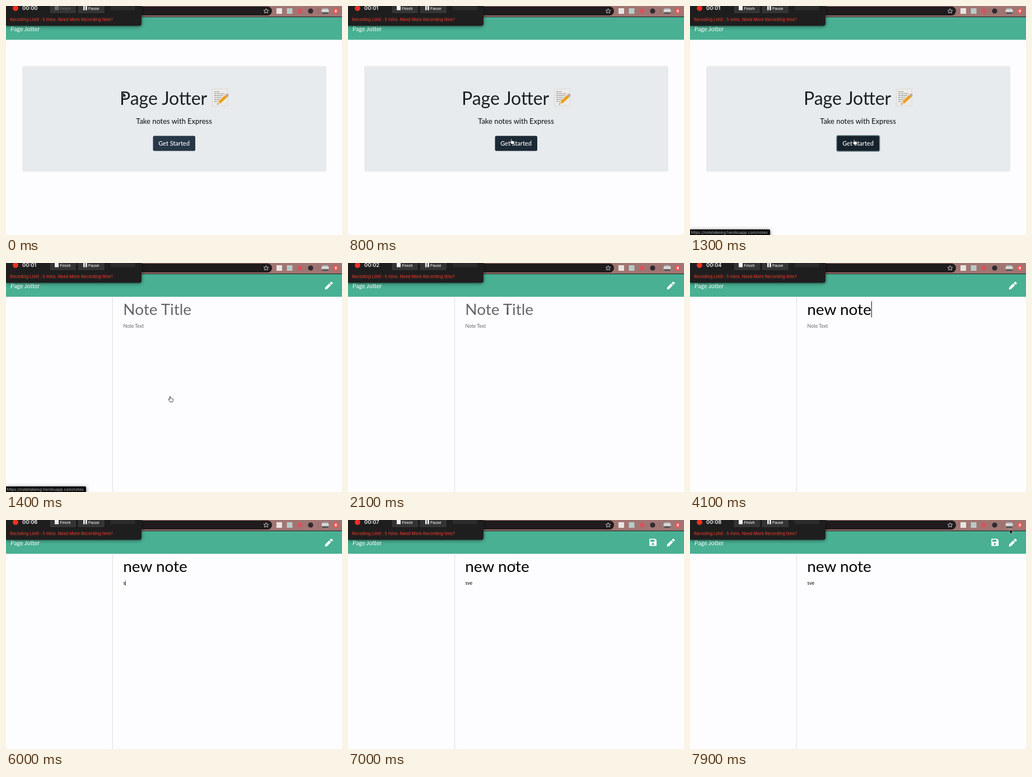
Recreate the animation shown at these times as an HTML page. Size 600 px wide and 410 px high, loop 8000 ms.

```html
<!DOCTYPE html>
<html lang="en">
<head>
<meta charset="utf-8">
<title>Page Jotter</title>
<style>
  html, body { margin: 0; width: 100%; height: 100%; overflow: hidden; background: #fdfcfe; }
  svg { display: block; width: 600px; height: 410px; font-family: Lato, sans-serif; }
  .ui { font-family: Inter, sans-serif; }
  .medium { font-weight: 500; }
  .panel { filter: drop-shadow(0 1px 3px rgba(0, 0, 0, .55)); }
</style>
</head>
<body>
<svg viewBox="0 0 600 410">
  <defs>
    <linearGradient id="photo" x2="0" y2="1">
      <stop offset="0" stop-color="#77787a"/>
      <stop offset=".4" stop-color="#e4e3e2"/>
      <stop offset=".62" stop-color="#c9c8c8"/>
      <stop offset=".75" stop-color="#39383a"/>
      <stop offset="1" stop-color="#9b9999"/>
    </linearGradient>
    <pattern id="meter" width="3" height="9" patternUnits="userSpaceOnUse">
      <path fill="#2e2e2f" d="M0 0h2v9H0z"/>
    </pattern>
  </defs>
  <rect width="600" height="410" fill="#fdfcfe"/>

  <!-- browser bar -->
  <rect width="600" height="20" fill="#a07572"/>
  <rect y="19" width="600" height="1" fill="#241b1b"/>
  <rect x="100" y="1" width="375" height="16" rx="8" fill="#201c1d"/>
  <path d="M464.500 4.700l1.300 2.800 3 .3-2.200 2 .6 3-2.700-1.600-2.700 1.600.6-3-2.200-2 3-.3z" fill="none" stroke="#e4dfdf" stroke-width=".9"/>
  <rect x="483" y="4" width="10" height="10" fill="#e9e4e2"/>
  <rect x="501.500" y="4" width="10" height="10" fill="#b9c9c5"/>
  <circle cx="525" cy="9" r="4" fill="#d9515c"/>
  <circle cx="544" cy="9" r="4.600" fill="#302a31"/>
  <path d="M557.500 4v10" stroke="#8a6261" stroke-width=".7"/>
  <circle cx="570" cy="9" r="6.600" fill="url(#photo)"/>
  <circle cx="589" cy="9" r="5" fill="#ec5b5d"/>
  <path d="M589 6.400l2.200 2.700h-1.400v2.300h-1.600v-2.300h-1.400z" fill="#fff"/>

  <!-- site header -->
  <rect y="20" width="600" height="40.500" fill="#49b093"/>
  <text x="8" y="44.500" font-size="10.700" fill="#fff">Page Jotter</text>

  <g id="home">
    <rect x="29" y="107.500" width="543" height="189" rx="3" fill="#e8ebed"/>
    <text x="203" y="176.500" font-size="32" fill="#1c1f22">Page Jotter</text>
    <g id="memo">
      <path d="M368.500 149l27.500-1 .5 30-28 1.500z" fill="#ecebe8" stroke="#d0cfcc" stroke-width=".7"/>
      <path d="M372 153.500h9M372 157h18M372 160.500h16M372 164h13M372 167.500h9M372 171h6" stroke="#77777a" stroke-width="1.100" stroke-dasharray="3 .8 2 .6"/>
      <path d="M377 176.500l2.200-6 3.500 4.200z" fill="#efcfa0"/>
      <path d="M377 176.500l.9-2.300 1.300 1.600z" fill="#333"/>
      <path d="M379.200 170.500l12.300-11.500 3.800 4.200-12.600 11.500z" fill="#f3ab2c"/>
      <path d="M381.400 172.800l12.200-11.500" stroke="#d1861e" stroke-width="1.100"/>
      <path d="M391.500 159l1.500-1.400 3.800 4.200-1.500 1.400z" fill="#a8b0b5"/>
      <path d="M393 157.600q2-1.500 3.600.3 1.600 2 .2 3.900z" fill="#ea8190"/>
    </g>
    <text class="medium" x="300" y="210.500" font-size="12.900" fill="#1c1f22" text-anchor="middle">Take notes with Express</text>
    <rect id="ring" x="261" y="231" width="78.500" height="30" rx="3.500" fill="#84999d"/>
    <rect id="button" x="262.500" y="232.500" width="75.500" height="27" rx="2.500"/>
    <text class="medium" x="300" y="249.700" font-size="11" fill="#fff" text-anchor="middle">Get Started</text>
  </g>

  <g id="editor">
    <path d="M190.500 60.500v350" stroke="#dddfe3"/>
    <path d="M570 43.800l-.5 3.700 3.700-.6 7.100-7.100-3.200-3.200zM578 35.700l1.800-1.800q1-.9 2 0l1.400 1.400q.9 1 0 2l-1.800 1.700z" fill="#fff"/>
    <path id="save" fill="#fff" fill-rule="evenodd" d="M539.500 33.500h8.800l2.700 2.700v9q0 1.300-1.300 1.300h-10.200q-1.300 0-1.300-1.300v-10.400q0-1.300 1.300-1.300zM540 35.300v3.800h7.200v-3.800zM546.500 43a2 2 0 1 0-4 0 2 2 0 1 0 4 0z"/>
    <text id="title" x="209.300" y="93" font-size="27.900" xml:space="preserve"></text>
    <text id="body" x="209.500" y="116" font-size="8.600" xml:space="preserve"></text>
    <rect id="caret"/>
  </g>

  <g id="status" class="ui">
    <path class="panel" d="M0 400h141q2 0 2 2v9H0z" fill="#0b0b0c"/>
    <text x="1.500" y="408" font-size="7" fill="#b4b4b6">https://notetakeing.herokuapp.com/notes</text>
  </g>

  <!-- recorder -->
  <g class="ui medium">
    <path class="panel" d="M0-5h242v36.500q0 4-4 4H0z" fill="#1f1e1f"/>
    <circle cx="17" cy="4" r="4.900" fill="#ee3026"/>
    <text id="clock" x="29" y="7" font-size="9.300" font-weight="600" fill="#f4f4f4"></text>
    <g fill="#343435" stroke="#4a4a4b" stroke-width=".6">
      <rect x="79.500" y="-4" width="44.500" height="16"/>
      <rect x="129.500" y="-4" width="45.500" height="16"/>
    </g>
    <g id="finish">
      <rect x="87" y="0" width="7" height="7.500"/>
      <text x="96.300" y="6.500" font-size="6.800">Finish</text>
    </g>
    <path d="M138 0h2.700v7.500h-2.700zM142 0h2.700v7.500h-2.700z" fill="#f2f2f2"/>
    <text x="147" y="6.500" font-size="6.600" fill="#f2f2f2">Pause</text>
    <rect x="187" width="44" height="7.500" fill="#272627"/>
    <rect x="187" width="44" height="7.500" fill="url(#meter)"/>
    <text x="7" y="27" font-size="7.400" fill="#d43a26">Recoding Limit : 5 mins. Need More Recording time?</text>
  </g>

  <g id="cursor">
    <path id="arrow" d="M0 0v9.500l2.200-2 1.600 3.500 1.500-.6-1.600-3.400 3-.2z" fill="#000" stroke="#fff" stroke-width=".6"/>
    <path id="hand" d="M-1 1q0-1.200 1-1.200t1 1.200v3q1.200-.7 1.700.3 1.300-.6 1.800.5 1.600-.3 1.600 1.200 0 2.500-1.300 4.800h-4.800q-.9-2-3-4.200-.8-1.300.4-1.600.9 0 1.600 1z" fill="#fff" stroke="#111" stroke-width=".9"/>
    <path id="beam" d="M-2-5q2 0 2 1.500Q0-5 2-5M0-3.500v7M-2 5q2 0 2-1.500Q0 5 2 5" fill="none" stroke="#222" stroke-width=".8"/>
  </g>
</svg>
<script>
const LOOP = 8000;
const PAGE_OPENED = 1400, TITLE_FOCUS = 2300, BODY_FOCUS = 4600, CURSOR_BACK = 6900;
const titleKeys = [2900, 3100, 3200, 3400, 3700, 3800, 3900, 4000];
const bodyKeys = [6000, 6200, 6400];
const mousePath = [
  [0, 209, 155], [150, 209, 155], [850, 293, 239], [1400, 293, 239],
  [1900, 285, 86], [CURSOR_BACK, 285, 86], [7700, 571, 16.5], [LOOP, 571, 16.5]
];
const $ = id => document.getElementById(id);
const show = (id, visible) => { $(id).style.display = visible ? '' : 'none'; };

function mouseAt(t) {
  const i = mousePath.findIndex(point => point[0] > t);
  const [t0, x0, y0] = mousePath[i - 1], [t1, x1, y1] = mousePath[i];
  const p = (t - t0) / (t1 - t0), ease = p * p * (3 - 2 * p);
  return [x0 + (x1 - x0) * ease, y0 + (y1 - y0) * ease];
}

function type(id, text, keys, placeholder, t) {
  const typed = text.slice(0, keys.filter(time => time <= t).length);
  $(id).textContent = typed || placeholder;
  $(id).setAttribute('fill', typed ? '#000' : '#656668');
  return typed;
}

function placeCaret(t, typed) {
  const inBody = t >= BODY_FOCUS;
  const field = $(inBody ? 'body' : 'title');
  const marks = [TITLE_FOCUS, ...titleKeys, BODY_FOCUS, ...bodyKeys].filter(time => time <= t);
  const blinkOn = marks.length > 0 && (t - marks.at(-1)) % 1000 < 500;
  show('caret', blinkOn);
  if (!blinkOn) return;
  const width = typed ? field.getSubStringLength(0, typed.length) : 0;
  const caret = $('caret');
  caret.setAttribute('x', +field.getAttribute('x') + width);
  caret.setAttribute('y', inBody ? 108.5 : 68.5);
  caret.setAttribute('height', inBody ? 9 : 29);
  caret.setAttribute('width', inBody ? 0.7 : 1);
}

function drawCursor(t) {
  const [x, y] = mouseAt(t);
  const hand = t >= 700 && t < 1500;
  const beam = t >= 1500 && y > 61;
  show('cursor', t < titleKeys[0] || t >= CURSOR_BACK);
  show('hand', hand);
  show('beam', beam);
  show('arrow', !hand && !beam);
  $('cursor').setAttribute('transform', `translate(${x} ${y}) scale(.9)`);
}

function draw(t) {
  const seconds = Math.floor((t + 250) / 1000);
  $('clock').textContent = '00:0' + seconds;
  $('finish').setAttribute('fill', seconds ? '#f2f2f2' : '#6c6c6d');

  const editing = t >= PAGE_OPENED;
  show('home', !editing);
  show('editor', editing);
  show('status', t >= 1000 && t < 1800);
  show('ring', t >= 1100);
  $('button').setAttribute('fill', t >= 1100 ? '#16222c' : t >= 700 ? '#1c2a36' : '#263748');

  if (editing) {
    const title = type('title', 'new note', titleKeys, 'Note Title', t);
    const body = type('body', 'sve', bodyKeys, 'Note Text', t);
    show('save', t >= bodyKeys[0] + 100);
    placeCaret(t, t >= BODY_FOCUS ? body : title);
  }
  drawCursor(t);
}

const start = performance.now();
function frame() {
  draw((performance.now() - start) % LOOP);
  requestAnimationFrame(frame);
}
frame();
</script>
</body>
</html>
```
